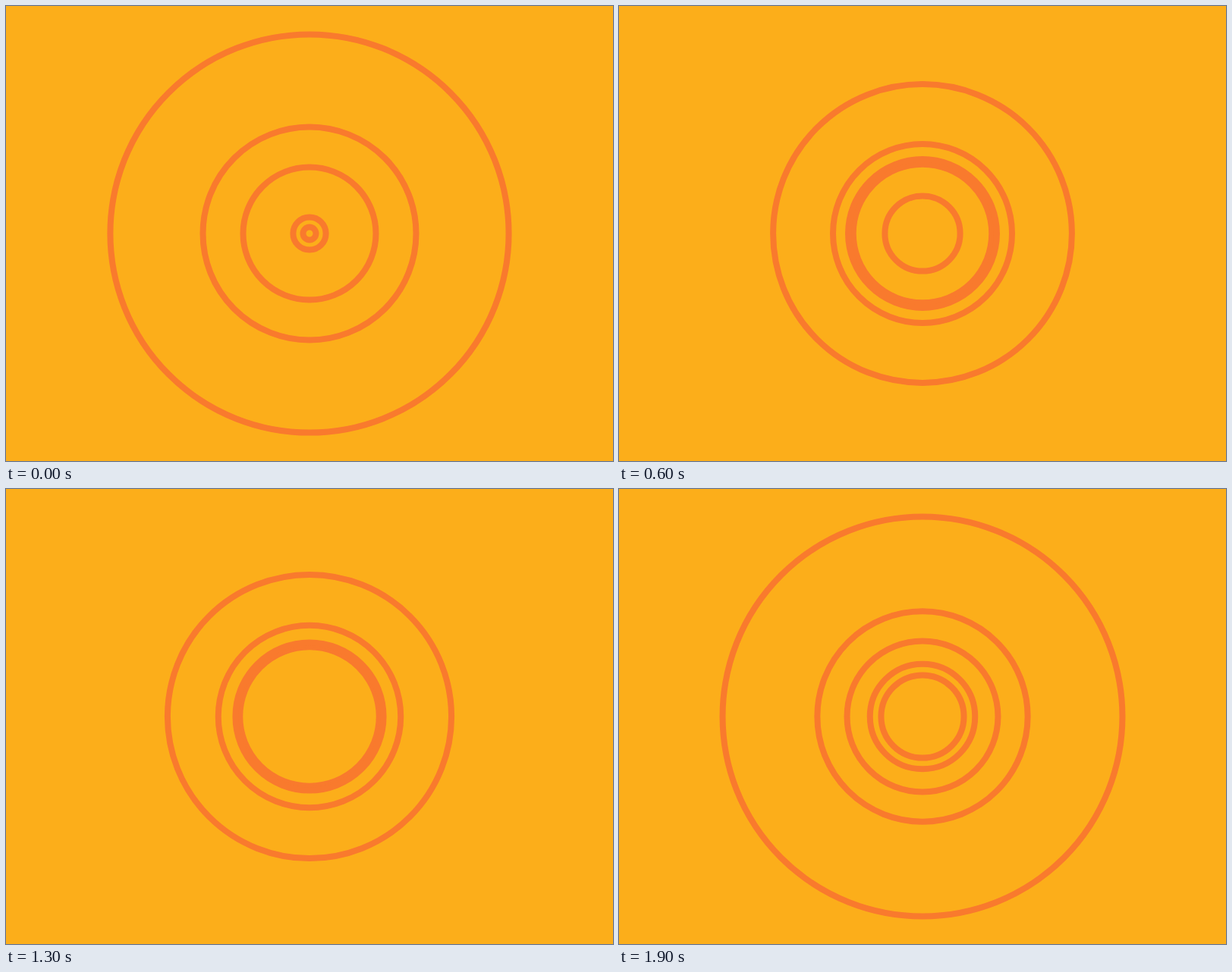
Recreate the animation shown at these times as an HTML page. Size 800 by 600 pixels, loop 2 s.

```html
<!DOCTYPE html>
<html lang="en">
<head>
<meta charset="utf-8">
<title>Rings</title>
<style>
  html, body {
    margin: 0;
    width: 100%;
    height: 100%;
    overflow: hidden;
    background: #fcae1a;
  }
  svg {
    display: block;
    width: 100%;
    height: 100%;
  }
  circle {
    fill: none;
    stroke: #f97a2d;
    stroke-width: 8px;
    /* the small head start keeps each step clear of its boundary */
    animation: resize 2s steps(20) -1ms infinite;
  }
  @keyframes resize {
    from { r: var(--start); }
    to { r: calc(var(--start) + 20 * var(--step)); }
  }
</style>
</head>
<body>
<svg viewBox="0 0 800 600">
  <g transform="translate(400 300)">
    <circle style="--start: 262.6px; --step: -10.95px"/>
    <circle style="--start: 140.5px; --step: -3.75px"/>
    <circle style="--start: 87.5px; --step: 0.63px"/>
    <circle style="--start: 21.6px; --step: 12.73px"/>
    <circle style="--start: 8.5px; --step: 6.85px"/>
  </g>
</svg>
</body>
</html>
```
